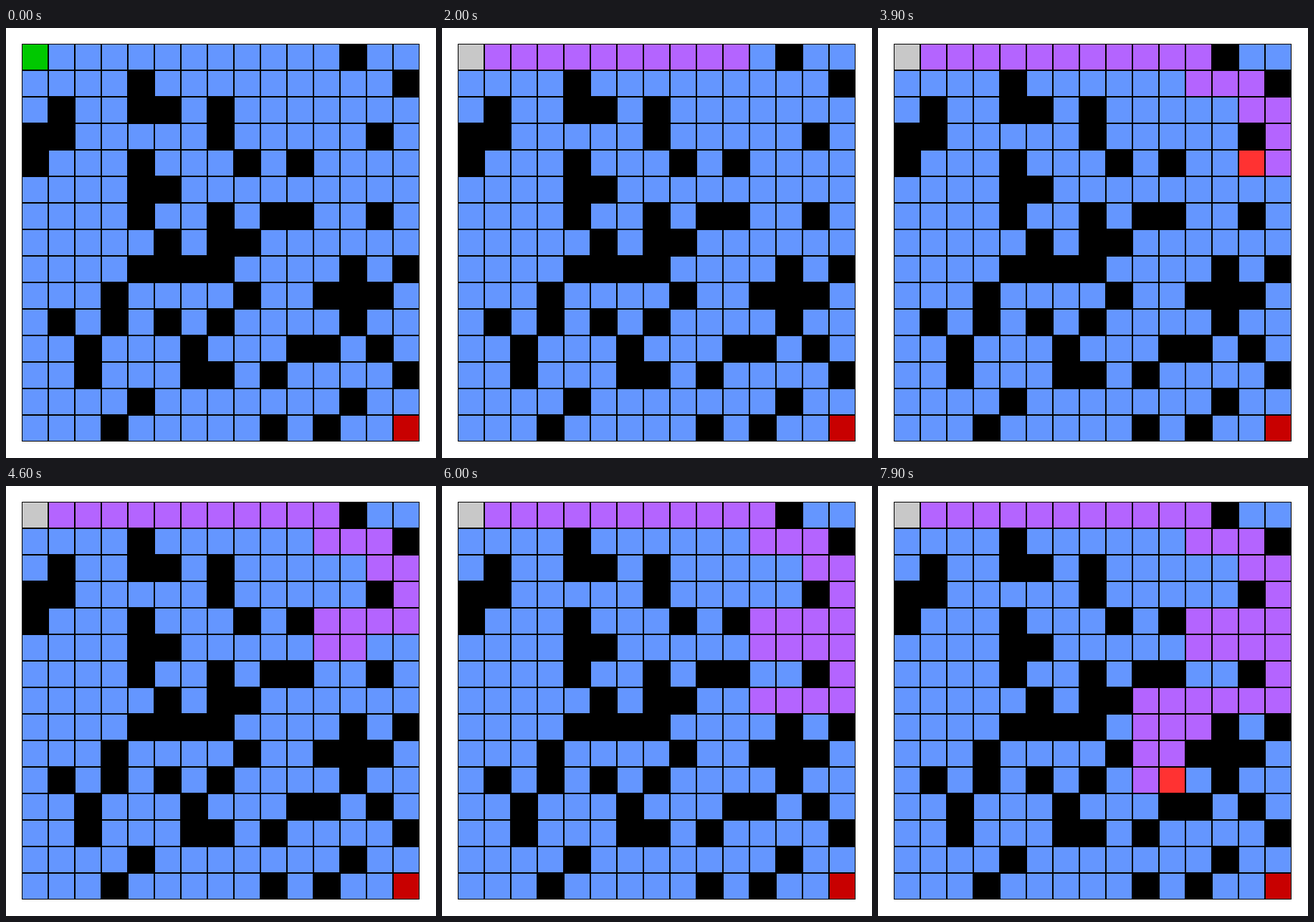
A matplotlib script that plays this animation: 600 by 600 pixels, repeating every 8 s.

```python
import matplotlib.pyplot as plt
from matplotlib.animation import FuncAnimation
from matplotlib.patches import Rectangle

SIZE, MARGIN, CELL, N = 600, 22, 37, 15
FRAMES, INTERVAL = 80, 100

OPEN, VISITED, CURRENT = "#6496ff", "#b464ff", "#ff3232"
START, START_DONE, GOAL = "#00c800", "#c8c8c8", "#c80000"

MAZE = """
............#..
....#.........#
.#..##.#.......
##.....#.....#.
#...#...#.#....
....##.........
....#..#.##..#.
.....#.##......
....####....#.#
...#....#..###.
.#.#.#.#....#..
..#...#...##.#.
..#...##.#....#
....#.......#..
...#.....#.#...
""".split()


def is_open(r, c):
    return 0 <= r < N and 0 <= c < N and MAZE[r][c] == "."


def depth_first(start):
    """Cells in visiting order: right, left, down, then up."""
    stack, order, seen = [start], [], set()
    while stack:
        cell = stack.pop()
        if cell in seen:
            continue
        seen.add(cell)
        order.append(cell)
        r, c = cell
        for dr, dc in ((-1, 0), (1, 0), (0, -1), (0, 1)):
            if is_open(r + dr, c + dc):
                stack.append((r + dr, c + dc))
    return order


start, goal = (0, 0), (N - 1, N - 1)
order = depth_first(start)

fig = plt.figure(figsize=(SIZE / 100, SIZE / 100), dpi=100, facecolor="white")
ax = fig.add_axes([0, 0, 1, 1])
ax.set(xlim=(0, SIZE), ylim=(SIZE, 0))
ax.axis("off")


def square(x, y, side, color):
    return ax.add_patch(Rectangle((x, y), side, side, facecolor=color,
                                  edgecolor="none", antialiased=False))


# Black board; each open cell leaves a one-pixel border of it showing.
square(MARGIN, MARGIN, N * CELL, "black")
tiles = {
    (r, c): square(MARGIN + c * CELL + 1, MARGIN + r * CELL + 1, CELL - 2, OPEN)
    for r in range(N) for c in range(N) if is_open(r, c)
}


def update(frame):
    step, active = divmod(frame, 2)
    for tile in tiles.values():
        tile.set_facecolor(OPEN)
    for cell in order[:step + 1]:
        tiles[cell].set_facecolor(VISITED)
    tiles[start].set_facecolor(START_DONE if step else START)
    tiles[goal].set_facecolor(GOAL)
    if active:
        tiles[order[step]].set_facecolor(CURRENT)
    return list(tiles.values())


anim = FuncAnimation(fig, update, frames=FRAMES, interval=INTERVAL,
                     init_func=lambda: update(0), repeat=True,
                     repeat_delay=0, blit=False)
plt.show()
```
